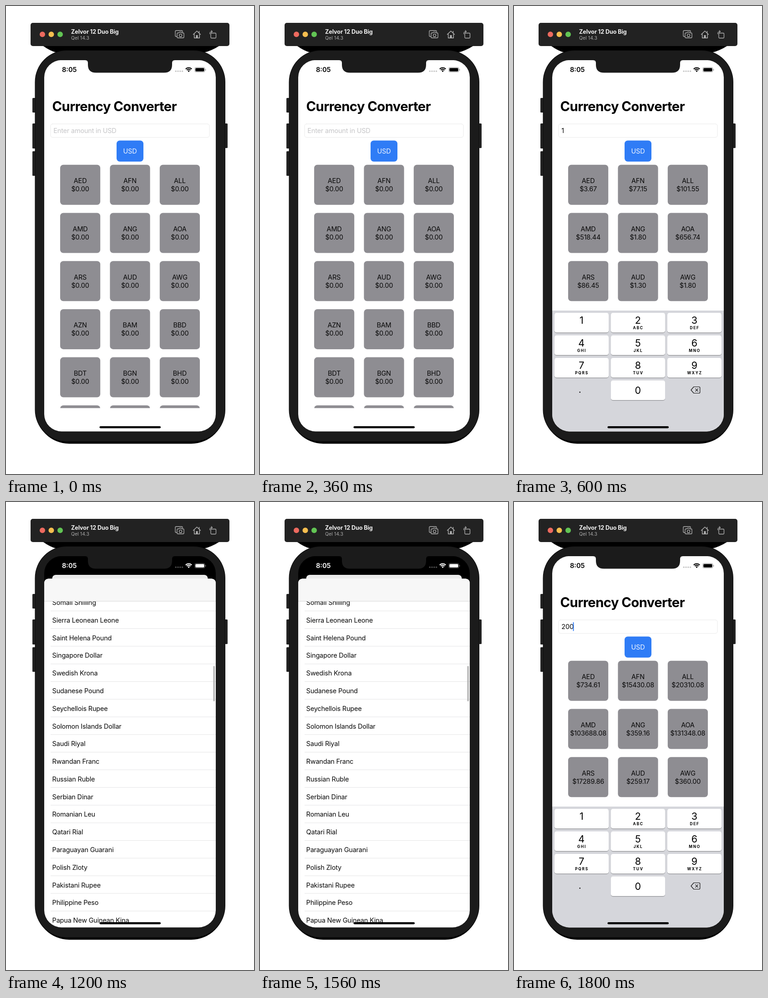
An HTML page with a canvas that plays this animation: 545x1028 px, repeating every 2.4 s.

```html
<!DOCTYPE html>
<html lang="en">
<head>
<meta charset="utf-8">
<title>Currency Converter</title>
<style>
  html, body { margin: 0; width: 100%; height: 100%; overflow: hidden; background: #fff; }
  canvas { display: block; width: 545px; height: 1028px; }
</style>
</head>
<body>
<canvas id="stage"></canvas>
<script>
const W = 545, H = 1028, STEP = 600;
const FONT = 'Inter, Roboto, sans-serif';
const BODY = '#1b1b1b', BLUE = '#2f7cf6';
const canvas = document.getElementById('stage');
const ctx = canvas.getContext('2d');
const scale = window.devicePixelRatio || 1;
canvas.width = W * scale;
canvas.height = H * scale;

const rates = {
  AED: 3.67305, AFN: 77.1504, ALL: 101.5504,
  AMD: 518.4404, ANG: 1.7958, AOA: 656.7404,
  ARS: 86.4493, AUD: 1.29585, AWG: 1.8
};
const codes = [...Object.keys(rates), 'AZN', 'BAM', 'BBD', 'BDT', 'BGN', 'BHD', '', '', ''];
const currencies = [
  'Somali Shilling', 'Sierra Leonean Leone', 'Saint Helena Pound', 'Singapore Dollar',
  'Swedish Krona', 'Sudanese Pound', 'Seychellois Rupee', 'Solomon Islands Dollar',
  'Saudi Riyal', 'Rwandan Franc', 'Russian Ruble', 'Serbian Dinar', 'Romanian Leu',
  'Qatari Rial', 'Paraguayan Guarani', 'Polish Zloty', 'Pakistani Rupee',
  'Philippine Peso', 'Papua New Guinean Kina'
];
const keyLetters = ['', 'ABC', 'DEF', 'GHI', 'JKL', 'MNO', 'PQRS', 'TUV', 'WXYZ'];

function box(x, y, w, h, r, color) {
  ctx.beginPath();
  ctx.roundRect(x, y, w, h, r);
  ctx.fillStyle = color;
  ctx.fill();
}

function dot(x, y, r, color) {
  ctx.beginPath();
  ctx.arc(x, y, r, 0, Math.PI * 2);
  ctx.fillStyle = color;
  ctx.fill();
}

function line(path, color, width = 1.3) {
  ctx.strokeStyle = color;
  ctx.lineWidth = width;
  ctx.lineJoin = ctx.lineCap = 'round';
  ctx.stroke(new Path2D(path));
}

function fillPath(path, color) {
  ctx.fillStyle = color;
  ctx.fill(new Path2D(path));
}

function text(str, x, y, { size = 14.5, weight = 400, color = '#080808', align = 'left', track = -0.2 } = {}) {
  ctx.font = `${weight} ${size}px ${FONT}`;
  ctx.letterSpacing = track + 'px';
  ctx.textAlign = align;
  ctx.fillStyle = color;
  ctx.fillText(str, x, y);
}

function clipped(x, y, w, h, r, draw) {
  ctx.save();
  ctx.beginPath();
  ctx.roundRect(x, y, w, h, r);
  ctx.clip();
  draw();
  ctx.restore();
}

function titleBar() {
  box(54, 37, 437, 51, 5, '#222');
  ['#ed6a5f', '#f6be4f', '#62c554'].forEach((c, i) => dot(80 + i * 19.5, 62.3, 6, c));
  text('Zelvor 12 Duo Big', 143, 60.5, { size: 12.6, weight: 700, color: '#f2f2f2', track: -0.1 });
  text('Qel 14.3', 143, 74, { size: 10.6, color: '#a9a9a9', track: 0 });

  const grey = '#b4b4b4';
  line('M375 67h-1q-2 0-2-2v-9q0-2 2-2h12q2 0 2 2v1', grey);
  line('M378 59h2l1-1.5h5l1 1.5h2q2 0 2 2v7q0 2-2 2h-11q-2 0-2-2v-7q0-2 2-2z', grey);
  line('M386.6 64.4a3 3 0 1 1-6 0a3 3 0 1 1 6 0', grey, 1.2);
  line('M411.5 62.5l8-7.6 8 7.6M413.7 61v9.3h11.6V61M424.5 59v-3.5', grey, 1.4);
  box(417.5, 64, 4, 6.5, 0.5, grey);
  line('M451.5 59.5h8.5q1.5 0 1.5 1.5v8q0 1.5-1.5 1.5h-8.5q-1.5 0-1.5-1.5v-8q0-1.5 1.5-1.5z', grey);
  line('M447.8 61.5q-.4-5.5 5.2-5.5M451 53.8l2.4 2.2-2.4 2.2', grey, 1.2);
}

function phoneBody() {
  fillPath('M82 88H468Q452 98 436 102H110Q96 98 82 88z', '#000');
  for (const [y, h] of [[202, 32], [258, 55], [319, 54]]) box(58, y, 9, h, 1.5, '#222');
  box(478, 258, 9, 54, 1.5, '#222');
  box(65, 180, 416, 781.5, [60, 60, 74, 74], '#000');
  box(63.5, 97, 418.5, 860, 70, '#080808');
  box(64.5, 98, 416.5, 858, 69, BODY);
}

function statusBar(ink, dots) {
  fillPath('M174 118V119Q180 119 180 125V129Q180 146.5 197.5 146.5H347.5Q365 146.5 365 129V125Q365 119 371 119V118z', BODY);
  text('8:05', 123, 145.3, { size: 14.6, weight: 600, color: ink, track: 0 });
  for (let i = 0; i < 4; i++) dot(373.2 + i * 4.8, 143.2, 1.7, dots);

  const cx = 401.5, cy = 145, a = Math.PI / 4;
  ctx.strokeStyle = ink;
  ctx.lineCap = 'butt';
  ctx.lineWidth = 2.2;
  for (const r of [9.4, 5.9]) {
    ctx.beginPath();
    ctx.arc(cx, cy, r, -Math.PI / 2 - a, -Math.PI / 2 + a);
    ctx.stroke();
  }
  ctx.beginPath();
  ctx.moveTo(cx, cy);
  ctx.arc(cx, cy, 3.3, -Math.PI / 2 - a, -Math.PI / 2 + a);
  ctx.fillStyle = ink;
  ctx.fill();

  ctx.globalAlpha = 0.4;
  ctx.beginPath();
  ctx.roundRect(414.7, 134.8, 22.4, 10.4, 3);
  ctx.lineWidth = 0.9;
  ctx.stroke();
  box(438, 138.3, 1.3, 3.6, 0.7, ink);
  ctx.globalAlpha = 1;
  box(416.2, 136.2, 19.4, 7.6, 1.8, ink);
}

function grid(amount, rows) {
  clipped(84, 345, 377, 538.3, 0, () => {
    codes.slice(0, rows * 3).forEach((code, i) => {
      const x = 119 + (i % 3) * 109.4, y = 348.8 + Math.floor(i / 3) * 105.7;
      box(x, y, 88.2, 88, 7, '#8e8d92');
      if (!code) return;
      const price = '$' + (amount * (rates[code] || 1)).toFixed(2);
      text(code, x + 44.1, y + 40.4, { align: 'center' });
      text(price, x + 44.1, y + 58.4, { align: 'center' });
    });
  });
}

function keyboard() {
  box(84, 669, 377, 266, 0, '#d5d6db');
  for (let i = 0; i < 9; i++) key(i % 3, Math.floor(i / 3), String(i + 1), keyLetters[i]);
  key(1, 3, '0');
  dot(144.8, 848.3, 1.2, '#000');
  line('M395 836.5h11.5q2.2 0 2.2 2.2v9.6q0 2.2-2.2 2.2H395l-6-7z', '#111', 1.2);
  line('M398.8 840.6l5.6 5.8M404.4 840.6l-5.6 5.8', '#111', 1.2);
}

function key(col, row, digit, letters) {
  const x = 89 + col * 124, y = 674 + row * 49.5, mid = x + 59.3;
  box(x, y + 1, 119, 43.4, 4.5, '#8b8c90');
  box(x, y, 119, 43.2, 4.5, '#fff');
  text(digit, mid, y + (digit === '0' ? 29 : 24), { size: 21.5, align: 'center', color: '#000', track: 0 });
  if (letters) text(letters, mid + 0.8, y + 36.2, { size: 8.4, weight: 700, align: 'center', color: '#000', track: 1.7 });
}

function converter(value, typing, caret) {
  box(84, 119, 377, 816, 0, '#fff');
  text('Currency Converter', 101.5, 230.5, { size: 29.2, weight: 700, color: '#000', track: -0.55 });

  ctx.beginPath();
  ctx.roundRect(98, 259, 349, 29.6, 4.5);
  ctx.strokeStyle = '#e9e9e9';
  ctx.lineWidth = 1;
  ctx.stroke();
  if (value) text(value, 104.3, 279.2);
  else text('Enter amount in USD', 104.3, 279.2, { color: '#c5c5c7' });
  if (caret) box(129.6, 264, 1.9, 19.5, 1, BLUE);

  box(243, 295.5, 59, 46.2, 7, BLUE);
  text('USD', 272.5, 324.2, { color: '#f4f8ff', align: 'center' });

  grid(Number(value), typing ? 3 : 6);
  if (typing) keyboard();
  statusBar('#000', '#c8c8c8');
}

function picker() {
  box(84, 119, 377, 816, 0, '#000');
  box(101.5, 160, 342, 30, 8, '#ebebeb');
  clipped(84, 168.5, 377, 770, [9, 9, 0, 0], () => {
    box(84, 168, 377, 770, 0, '#fff');
    currencies.forEach((name, i) => {
      const y = 239.3 + i * 38.78;
      text(name, 101.6, y - 13.2);
      box(98, y - 0.5, 363, 1, 0, '#e4e4e5');
    });
    box(84, 168, 377, 50, 0, '#f7f7f7');
    box(84, 217.5, 377, 1, 0, '#d6d6d6');
    box(455.8, 360.3, 2.8, 77.5, 1.4, '#a6a6a6');
  });
  statusBar('#fff', '#4a4a4a');
}

const scenes = [
  () => converter('', false),
  () => converter('1', true),
  picker,
  () => converter('200', true, true)
];

function draw(now) {
  ctx.setTransform(scale, 0, 0, scale, 0, 0);
  ctx.fillStyle = '#fff';
  ctx.fillRect(0, 0, W, H);
  phoneBody();
  titleBar();
  clipped(84, 118.8, 377, 815.7, 38, () => {
    scenes[Math.floor(now / STEP) % scenes.length]();
    box(205.5, 923, 134.5, 4.5, 2.25, '#000');
  });
}

function tick() {
  draw(performance.now());
  requestAnimationFrame(tick);
}
tick();
</script>
</body>
</html>
```
